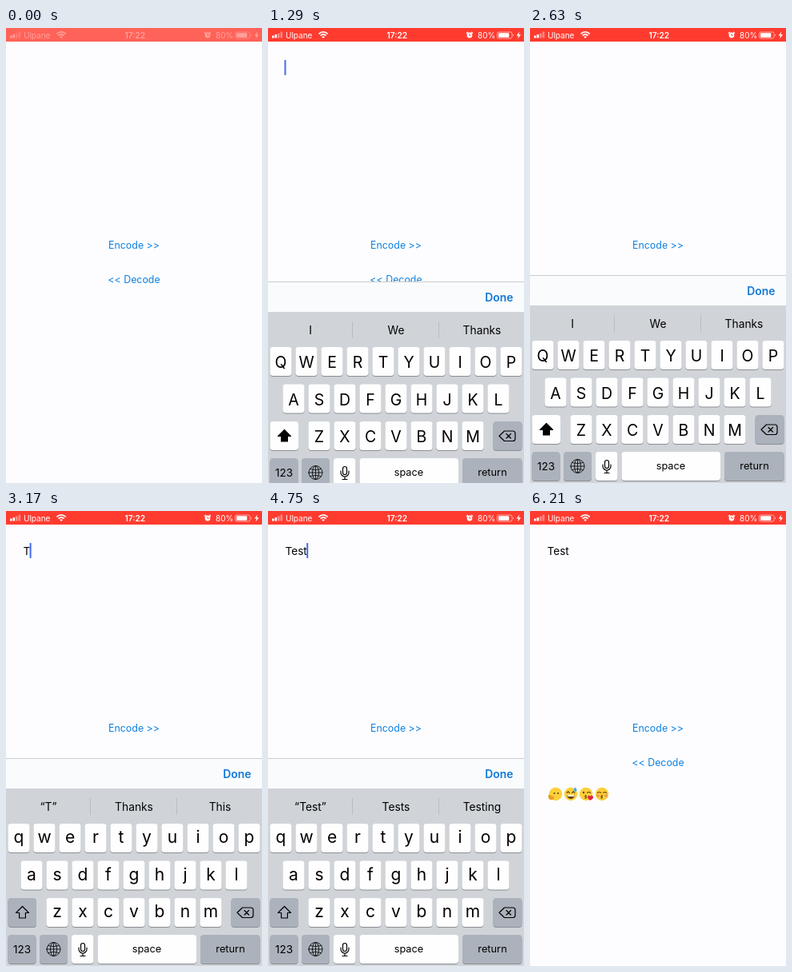
An HTML page that plays this animation: 320 by 569 pixels, repeating every 6500 ms.

```html
<!DOCTYPE html>
<html lang="en">
<head>
<meta charset="utf-8">
<title>Emoji encoder</title>
<style>
html, body { margin: 0; width: 100%; height: 100%; overflow: hidden; background: #fdfdff; }
svg { display: block; width: 320px; height: 569px; font-family: Inter, Roboto, sans-serif; }
.mid { text-anchor: middle; }
.links { font-size: 12.4px; fill: #0f80de; }
.line { fill: none; stroke: #000; stroke-width: 1.2; stroke-linejoin: round; stroke-linecap: round; }
.thin { stroke-width: .8; }
.white { fill: none; stroke: #fff; }
.brown { fill: none; stroke: #6b3f10; stroke-width: 1.1; stroke-linecap: round; }
</style>
</head>
<body>
<svg id="stage" viewBox="0 0 320 569"></svg>
<script>
const LOOP = 6500, FRAME = 1000 / 24;
const KEYS_IN = 1000, KEYS_OUT = 5370, LOWER = 3000, EMOJI = 6200;
const KEYBOARD_H = 222, TOOLBAR_H = 260;
const RED = '#ff3b30', GREY = '#abb2bb', PALE = '#d0d4d9', WHITE = '#fefefe', EDGE = '#c9ccd0';

// [start, text, caret x]
const typed = [[0, '', 20.5], [2960, 'T', 29.6], [3500, 'Te', 37], [3880, 'Tes', 43.6], [4500, 'Test', 48.2]];
// [start, left, middle, right]
const hints = [
  [0, 'I', 'We', 'Thanks'],
  [3050, '“T”', 'Thanks', 'This'],
  [3600, '“Te”', 'Tell', 'Test'],
  [4000, '“Tes”', 'Yes', 'Test'],
  [4600, '“Test”', 'Tests', 'Testing']
];

const label = (x, y, s, attrs = '') => `<text x="${x}" y="${y}" class="mid" ${attrs}>${s}</text>`;
const box = (x, y, w, h, fill, r = 0, attrs = '') =>
  `<rect x="${x}" y="${y}" width="${w}" height="${h}" rx="${r}" fill="${fill}" ${attrs}/>`;
const key = (x, y, w, fill = WHITE, attrs = '') =>
  box(x, y + 1, w, 36, '#8b8e93', 4) + box(x, y, w, 36, fill, 4, attrs);

const rows = [['QWERTYUIOP', 16, 391], ['ASDFGHJKL', 32, 437.5], ['ZXCVBNM', 64, 484]];
const eachKey = draw => rows.map(([s, x, y]) => [...s].map((c, i) => draw(c, x + i * 32, y)).join('')).join('');

const statusBar = `
  <rect id="bar" width="320" height="17"/>
  <g id="status" fill="#fff" font-size="10">
    ${[3, 4.5, 6, 8].map((h, i) => box(5 + i * 3.5, 12.5 - h, 2.6, h, '#fff', .6, i > 1 ? 'opacity=".4"' : '')).join('')}
    <text x="22" y="12.5">Ulpane</text>
    <path class="white" stroke-width="1.7" d="M63.4 7.3Q69.1 2.4 74.8 7.3M65.6 9.5Q69.1 6.5 72.6 9.5"/>
    <path d="M67.200 11Q69.100 9.500 71 11L69.100 13Z"/>
    ${label(161.3, 12.5, '17:22', 'font-weight="600" font-size="10.2"')}
    <circle cx="252" cy="9" r="3.4"/>
    <path class="white" stroke-width="1.2" stroke-linecap="round" d="M248.3 6.4l1.3-1.3M255.7 6.4l-1.3-1.3"/>
    <path d="M252 7v2.2h1.7" fill="none" stroke="${RED}" stroke-width=".9"/>
    <text x="262" y="12.5">80%</text>
    <rect class="white" x="286.5" y="5" width="18.5" height="8" rx="2" stroke-width=".8" opacity=".7"/>
    ${box(288, 6.3, 13.3, 5.4, '#fff', .8)}
    <path d="M306 7.500q1.600 1.500 0 3z"/>
    <path d="M314.500 4.500l-4 5h2.600l-1 4 4-5.200h-2.700z"/>
  </g>`;

const icons = `
  <path id="shift" class="line" d="M20.5 494.5L28.5 502.5H24.4V509H16.600V502.500H12.500Z"/>
  <path class="line" d="M295.5 496h10.5q3 0 3 3v6.5q0 3-3 3h-10.5l-6.5-6.25zM298 499.5l5.5 5.5m0-5.5l-5.5 5.5"/>
  <path class="line thin" d="M51 548a8.5 8.5 0 0 1 17 0a8.5 8.5 0 0 1-17 0zM55.5 548a4 8.500 0 0 1 8 0a4 8.500 0 0 1-8 0z
    M51 548h17M59.5 539.5v17M52.5 543.5q7 2.5 14 0M52.5 552.5q7-2.5 14 0"/>
  <path class="line" d="M93.5 543a2.5 2.5 0 0 1 5 0v5a2.5 2.5 0 0 1-5 0zM91 546v2a5 5 0 0 0 10 0v-2M96 553v3.5M93 556.5h6"/>`;

const keyboard = `
  <g id="keyboard">
    <g id="predict">
      ${box(0, 347, 320, 39, PALE)}
      ${box(107, 354, 105, 31, '#eceef1', 4, 'id="pick"')}
      <path id="dividers" d="M105.5 359v21M213.5 359v21" stroke="#b8bdc4"/>
      <g id="hints" font-size="13.8">${[53, 160, 267.5].map(x => label(x, 375, '')).join('')}</g>
    </g>
    ${box(0, 385, 320, 184, PALE)}
    ${eachKey((c, x, y) => key(x - 13.6, y, 27.2))}
    ${key(2.5, 484, 35.5, GREY, 'id="shiftKey"')}${key(281.5, 484, 36, GREY)}
    ${key(2.5, 530, 35, GREY)}${key(42, 530, 35, GREY)}${key(82, 530, 27.5)}${key(114.5, 530, 123.5)}${key(243, 530, 74.5, GREY)}
    <g id="upper" font-size="19.5">${eachKey((c, x, y) => label(x, y + 26, c))}</g>
    <g id="lower" font-size="21">${eachKey((c, x, y) => label(x, y + 24, c.toLowerCase()))}</g>
    ${icons}
    ${label(20, 553, '123', 'font-size="13.5"')}
    ${label(176, 552, 'space', 'font-size="12.8"')}
    ${label(280.5, 552, 'return', 'font-size="12.8"')}
  </g>`;

const face = (x, parts) => `<g transform="translate(${x} 354)"><circle r="8.2" fill="#fdd03a"/>${parts}</g>`;
const KISS = 'M-1 1.5q3 .5 0 2 3 .5 0 2';
const emoji = `
  <g id="emoji">
    ${face(32, `<circle cx="-1.5" cy="-1" r="1.1" fill="#6b3f10"/><circle cx="3" cy="-1" r="1.1" fill="#6b3f10"/>
      <path d="M-9 1q2-1 3 1l4 1q1 3-2 4t-5-2z" fill="#e9a020"/>`)}
    ${face(51, `<path class="brown" d="M-5-1.5l1.7-1.7 1.7 1.7M1.5-1.5l1.7-1.7 1.7 1.7"/>
      <path d="M-5 1h10q-1 5-5 5t-5-5z" fill="#6b3f10"/><path d="M-4.5 1h9l-.6 2h-7.8z" fill="#fff"/>
      <path d="M5.5-8.5q4 4.5 0 5.5-4-1 0-5.5z" fill="#46a8e8"/>`)}
    ${face(70, `<circle cx="-3" cy="-2" r="1.2" fill="#6b3f10"/>
      <path class="brown" d="M1.5-1.5q2-2 4 0${KISS.replace('M', 'M')}"/>
      <path d="M5.5 8q-5-3-3-5.5 2-1.5 3 .5 1-2 3-.5 2 2.5-3 5.5z" fill="#e5263a"/>`)}
    ${face(90, `<circle cx="-5" cy="2" r="2" fill="#f59a4c"/><circle cx="5" cy="2" r="2" fill="#f59a4c"/>
      <path class="brown" d="M-5.5-1.5q2-2 4 0M1.5-1.5q2-2 4 0${KISS}"/>`)}
  </g>`;

document.getElementById('stage').innerHTML = `
  ${box(0, 0, 320, 569, '#fdfdff')}
  ${box(19, 40, 26, 20, '#dbe4ee', 0, 'id="mark"')}
  <text id="word" x="21.5" y="55" font-size="13.6"></text>
  ${box(0, 40, 2, 19, '#426bf2', .5, 'id="caret"')}
  <g class="links">${label(160, 276.2, 'Encode &gt;&gt;')}${label(160, 319, '&lt;&lt; Decode')}</g>
  ${emoji}
  ${keyboard}
  <g id="toolbar">
    ${box(0, 309, 320, 38, '#fafbfc')}
    <path id="edge" d="M0 309.5h320"/>
    <text id="done" x="306.5" y="333.7" text-anchor="end" font-size="13.9" font-weight="600" fill="#0f78d8">Done</text>
  </g>
  ${statusBar}`;

const el = Object.fromEntries([...document.querySelectorAll('[id]')].map(e => [e.id, e]));
const set = (id, name, value) => el[id].setAttribute(name, value);
const show = (id, on) => set(id, 'opacity', +on);
const ramp = (t, a, b) => Math.min(1, Math.max(0, (t - a) / (b - a)));
const mix = (a, b, p) => a + (b - a) * p;
const current = (list, t) => list.filter(s => s[0] <= t).pop();

// critically damped spring, 0 to 1
function spring(ms) {
  const x = Math.max(0, ms) / 1000 * Math.sqrt(1000 / 3);
  return 1 - (1 + x) * Math.exp(-x);
}

function caretAlpha(t) {
  if (t < KEYS_IN || t >= KEYS_OUT) return 0;
  if (t < 1900) return 1 - ramp(t, 1630, 1750);
  if (t < 2400) return ramp(t, 1960, 2125);
  if (t < 2960) return 1 - ramp(t, 2460, 2625);
  return 1 - ramp(t, 5000, 5125);
}

function render(t) {
  const fade = ramp(t, 0, 166);
  set('bar', 'fill', `rgb(255,${mix(98, 59, fade)},${mix(88, 48, fade)})`);
  set('status', 'opacity', mix(.4, 1, fade));

  const closing = t >= KEYS_OUT;
  const hidden = closing ? spring(t - KEYS_OUT) : 1 - spring(t - KEYS_IN);
  const gone = t < KEYS_IN || t >= 5915;
  const slide = (id, h) => {
    set(id, 'transform', `translate(0 ${hidden * h})`);
    show(id, !gone);
  };
  slide('toolbar', TOOLBAR_H);
  // without the suggestion row the keyboard has a shorter way down
  slide('keyboard', closing ? KEYBOARD_H : TOOLBAR_H);
  show('predict', !closing);
  set('edge', 'stroke', closing ? '#e6e8ea' : EDGE);
  set('done', 'opacity', t < 5340 ? mix(1, .35, ramp(t, 5170, 5290)) : mix(.35, 1, ramp(t, 5340, 5500)));

  const lower = t >= LOWER;
  show('lower', lower);
  show('upper', !lower);
  set('shiftKey', 'fill', lower ? GREY : WHITE);
  set('shift', 'style', lower ? '' : 'fill:#000');

  const [, word, x] = current(typed, t);
  el.word.textContent = word;
  set('caret', 'x', x);
  set('caret', 'opacity', caretAlpha(t));

  const [since, ...words] = current(hints, t);
  const corrected = words[1] === 'Yes';
  [...el.hints.children].forEach((e, i) => e.textContent = words[i]);
  set('hints', 'opacity', since ? ramp(t, since - 40, since + 120) : 1);
  show('pick', corrected);
  show('dividers', !corrected);
  show('mark', corrected && word === 'Tes');
  show('emoji', t >= EMOJI);
}

const start = performance.now();
function tick() {
  const t = (performance.now() - start) % LOOP;
  render(Math.floor((t + 5) / FRAME) * FRAME);
  requestAnimationFrame(tick);
}
tick();
</script>
</body>
</html>
```
